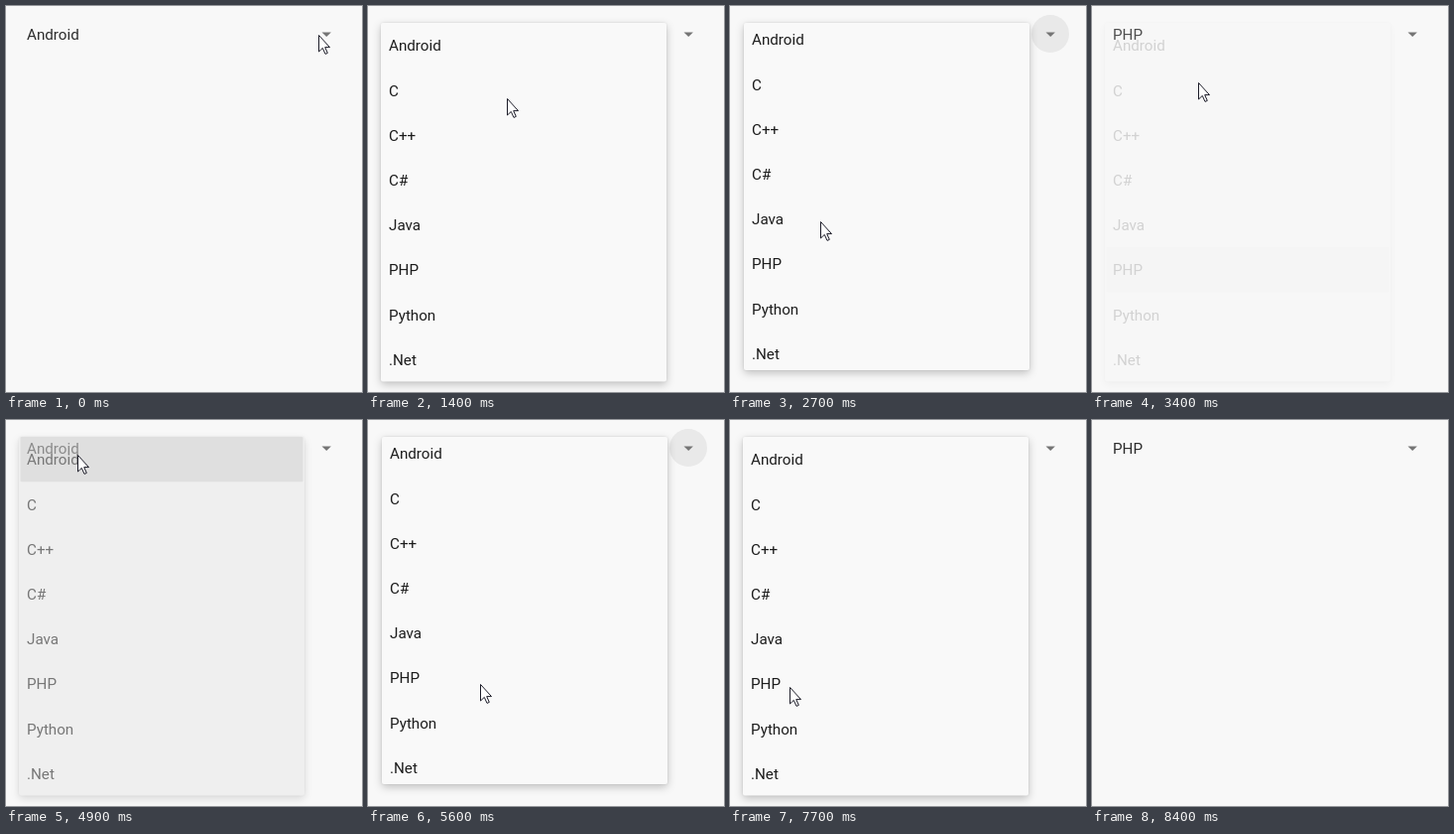
An HTML page for the animation above (9.1 s loop, 359 by 389 pixels).

```html
<!DOCTYPE html>
<html lang="en">
<head>
<meta charset="utf-8">
<title>Language spinner</title>
<style>
  html, body { margin: 0; width: 100%; height: 100%; overflow: hidden; background: #f8f8f8; }
  svg { display: block; font: 15.2px Roboto, sans-serif; }
  #panel { filter: drop-shadow(0 0 1px rgba(0,0,0,.1)) drop-shadow(0 3.5px 4.5px rgba(0,0,0,.22)); }
</style>
</head>
<body>
<svg width="359" height="389" viewBox="0 0 359 389">
  <defs><clipPath id="reveal"><rect id="clip" x="13" y="17" width="288"/></clipPath></defs>
  <circle id="ripple" cx="323" cy="28" r="19" fill="#e9e9e9"/>
  <path d="M318.5 26.4h9.4l-4.7 4.7z" fill="#757575"/>
  <text id="label" x="21" y="34" fill="#2c2c2c"></text>
  <g id="menu">
    <rect id="panel" x="13" y="17" width="288" rx="2"/>
    <g clip-path="url(#reveal)"><g id="items" fill="#1c1c1c">
      <rect id="press" x="14.5" width="285" height="45.2" rx="1" fill="#000"/>
    </g></g>
  </g>
  <path id="cursor" d="M.5.5v16.5l3.8-3.6 2.7 6 2.3-1-2.6-5.8h4.8z" fill="#fff" stroke="#1c1c28"/>
</svg>
<script>
const LOOP = 9100, STEP = 100, ROW = 45.2, TOP = 17, HEIGHT = 8 * ROW;
const OPENING = 300, CLOSING = 240, EXIT = 8400;
const names = ['Android', 'C', 'C++', 'C#', 'Java', 'PHP', 'Python', '.Net'];

// The pointer follows the hover points after opening; the last one is picked.
const visits = [
  { open: 900, pick: 1700, pace: 500, hover: [[140, 93]], rest: [105, 30] },
  { open: 2500, pick: 3200, pace: 500, hover: [[87, 268]], rest: [112, 24] },
  { open: 3900, pick: 4800, pace: 500, hover: [[72, 35]], rest: [72, 35] },
  { open: 5400, pick: 8100, pace: 300, rest: [342, 369],
    hover: [[115, 275], [98, 352], [104, 345], [87, 220], [75, 59], [50, 360], [55, 290], [60, 268]] }
];

const el = id => document.getElementById(id);
const set = (id, attrs) => {
  for (const key in attrs) el(id).setAttribute(key, attrs[key]);
};
const clamp = v => Math.max(0, Math.min(1, v));
const easeOut = p => 1 - (1 - clamp(p)) ** 3;
const rowOf = ({ hover }) => Math.floor((hover[hover.length - 1][1] - TOP) / ROW);

const glides = [{ at: 0, over: 200, to: [288, 29] }];
for (const { open, pick, pace, hover, rest } of visits) {
  hover.forEach((to, i) => glides.push({ at: open + i * pace, over: pace, to }));
  glides.push({ at: pick, over: pace, to: rest });
}

const pointerAt = t => glides.reduce((from, { at, over, to }) => {
  const k = easeOut((t - at) / over);
  return from.map((v, i) => v + (to[i] - v) * k);
}, [315, 29]).map(Math.round);

names.forEach((name, i) => {
  const text = document.createElementNS('http://www.w3.org/2000/svg', 'text');
  text.textContent = name;
  text.setAttribute('x', 21);
  text.setAttribute('y', Math.round(45.45 + i * ROW));
  el('items').append(text);
});

function render(time) {
  const t = Math.floor(time % LOOP / STEP) * STEP;
  const index = visits.filter(v => v.open <= t).length - 1;
  const visit = visits[Math.max(index, 0)];
  const sinceOpen = t - visit.open, sincePick = t - visit.pick;
  const pressed = sincePick >= 0;
  const chosen = pressed ? visit : visits[index - 1];

  const opacity = pressed ? clamp(1 - sincePick / CLOSING) : clamp(sinceOpen / 120);
  const away = 1 - easeOut(sinceOpen / OPENING);
  const height = HEIGHT - 310 * away;
  const shade = sincePick > 0 ? 248 - 26 * opacity : 249;
  const ripple = sinceOpen < 0 ? 0 : clamp(Math.min(.5 + sinceOpen / 200, 2 - sinceOpen / 250));

  el('label').textContent = names[chosen ? rowOf(chosen) : 0];
  set('ripple', { opacity: ripple });
  set('menu', { opacity, transform: `translate(${Math.round(23 * away)} 0)` });
  set('panel', { height, fill: `rgb(${shade},${shade},${shade})` });
  set('clip', { height });
  set('items', { transform: `translate(0 ${-Math.round(169 * away)})` });
  set('press', { y: TOP + rowOf(visit) * ROW, opacity: pressed ? .2 * opacity : 0 });
  set('cursor', {
    transform: `translate(${pointerAt(t)})`,
    visibility: t < EXIT ? 'visible' : 'hidden'
  });
}

const start = performance.now();
function tick() {
  render(performance.now() - start);
  requestAnimationFrame(tick);
}
tick();
</script>
</body>
</html>
```
